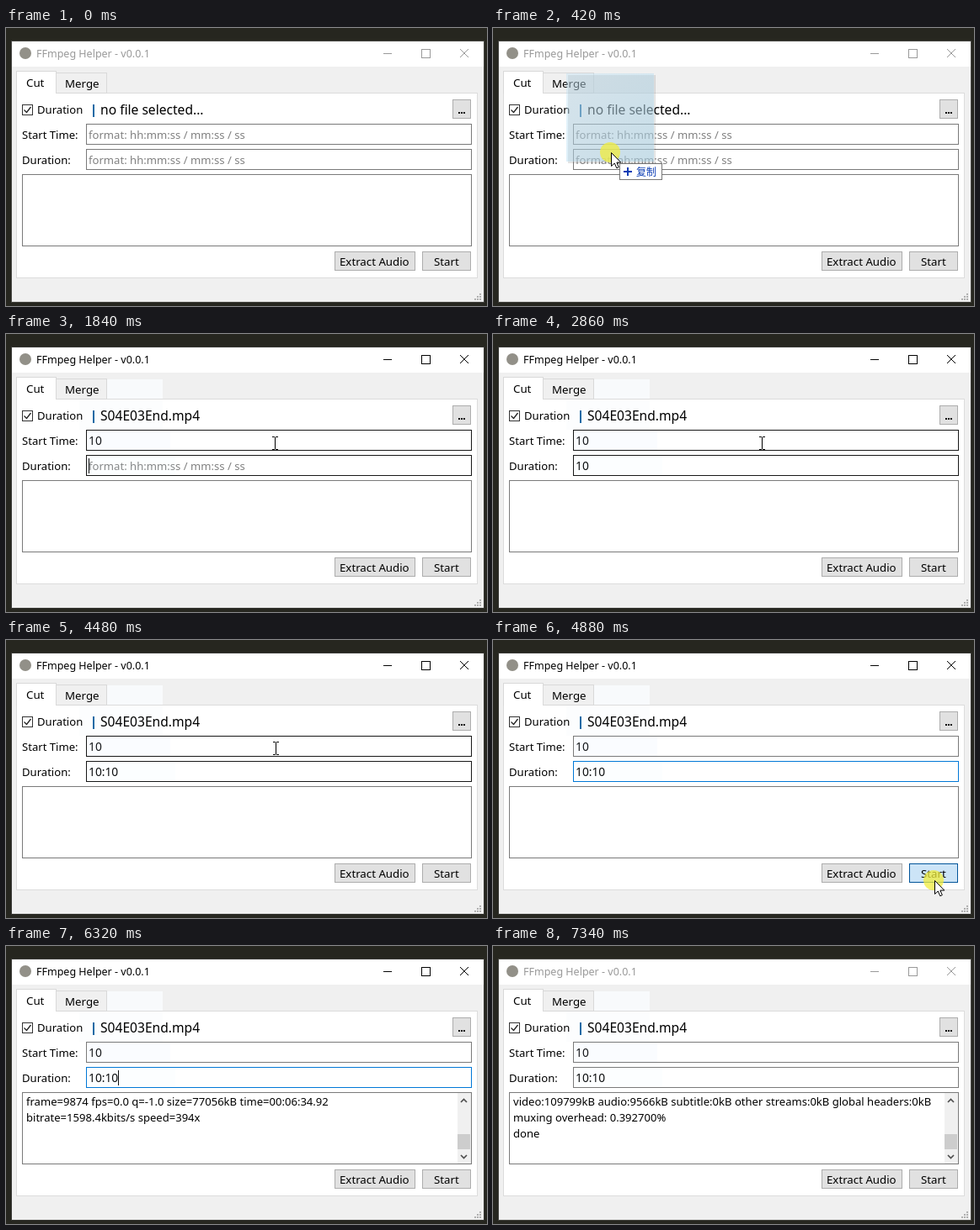
An HTML page with a canvas that plays this animation: 571x331 px, repeating every 8 s.

```html
<!DOCTYPE html>
<html lang="en">
<head>
<meta charset="utf-8">
<title>FFmpeg Helper</title>
<style>
  html, body { margin: 0; width: 100%; height: 100%; overflow: hidden; background: #26261f; }
  canvas { display: block; }
</style>
</head>
<body>
<canvas id="stage" width="571" height="331"></canvas>
<script>
const ctx = document.getElementById('stage').getContext('2d');
const LOOP = 8000;
const SANS = '"Noto Sans", "Open Sans", sans-serif';
const HINT = 'format: hh:mm:ss / mm:ss / ss';
const GREY = '#7a7a7a', DARK = '#171717', BLUE = '#0078d7';

const progress = (frame, size, time, rate, speed) => [
  `frame=${frame} fps=0.0 q=-1.0 size=${size}kB time=${time}`,
  `bitrate=${rate}kbits/s speed=${speed}x`
];

// Each step overrides part of the state from its time (ms) onward.
const steps = [
  [0, { active: false, file: 'no file selected...', start: '', duration: '', caret: '',
        startEdge: GREY, durationEdge: GREY, log: null, cursor: null, drag: false,
        click: false, trace: false, pressed: false }],
  [420, { drag: true, click: true, cursor: ['arrow', 140, 148] }],
  [630, { cursor: ['arrow', 200, 99] }],
  [830, { drag: false, click: false, trace: true, file: 'S04E03End.mp4',
          startEdge: DARK, cursor: ['arrow', 248, 89] }],
  [1020, { cursor: ['arrow', 290, 105] }],
  [1220, { active: true, caret: 'start', durationEdge: DARK, cursor: ['beam', 319, 130] }],
  [1420, { start: '10' }],
  [1840, { caret: 'duration' }],
  [2440, { duration: '1' }],
  [2650, { duration: '10' }],
  [2860, { caret: '' }],
  [3460, { duration: '10:', caret: 'duration' }],
  [3860, { duration: '10:10', caret: '' }],
  [4480, { cursor: ['beam', 320, 129] }],
  [4680, { cursor: ['arrow', 430, 215], startEdge: GREY, durationEdge: BLUE }],
  [4880, { cursor: ['arrow', 524, 286], click: true, pressed: true }],
  [5090, { click: false, pressed: false, log: ['Stream mapping:', '  Stream #0:0 -> #0:0 (copy)'] }],
  [5290, { cursor: ['beam', 400, 262] }],
  [5500, { cursor: ['beam', 313, 244],
           log: ['  Stream #0:1 -> #0:1 (copy)', 'Press [q] to stop, [?] for help'] }],
  [5700, { cursor: null }],
  [6120, { caret: 'duration', log: progress(5210, 40448, '00:03:28.40', '1589.9', 415) }],
  [6320, { log: progress(9874, 77056, '00:06:34.92', '1598.4', 394) }],
  [6520, { caret: '', log: progress(14120, 110336, '00:09:24.76', '1600.5', 376) }],
  [6720, { log: ['video:109799kB audio:9566kB subtitle:0kB other streams:0kB global headers:0kB',
                 'muxing overhead: 0.392700%', 'done'] }],
  [7120, { active: false, durationEdge: GREY }]
];

const stateAt = t => Object.assign({}, ...steps.filter(s => s[0] <= t).map(s => s[1]));

function fill(x, y, w, h, color) {
  ctx.fillStyle = color;
  ctx.fillRect(x, y, w, h);
}

function box(x, y, w, h, color, edge) {
  fill(x, y, w, h, edge);
  fill(x + 1, y + 1, w - 2, h - 2, color);
}

function text(str, x, y, size = 13.1, color = '#000', family = SANS) {
  ctx.font = `${size}px ${family}`;
  ctx.fillStyle = color;
  ctx.fillText(str, x, y);
}

function line(points, color, width = 1) {
  ctx.beginPath();
  points.forEach(([x, y]) => ctx.lineTo(x, y));
  ctx.strokeStyle = color;
  ctx.lineWidth = width;
  ctx.stroke();
}

function disc(x, y, r, color) {
  ctx.beginPath();
  ctx.arc(x, y, r, 0, 2 * Math.PI);
  ctx.fillStyle = color;
  ctx.fill();
}

function button(label, x, y, w, textX, pressed) {
  box(x, y, w, 23, pressed ? '#cce4f7' : '#e1e1e1', pressed ? '#005499' : '#adadad');
  text(label, textX, y + 17, 13.25);
}

function field(label, value, y, edge, caret) {
  text(label, 19, y + 18);
  box(95, y, 458, 25, '#fff', edge);
  if (value) text(value, 98, y + 18, 13.8);
  else text(HINT, 98, y + 18, 13.1, '#808080');
  if (caret) {
    const width = value ? ctx.measureText(value).width : 0;
    fill(98 + Math.floor(width), y + 4, 1, 18, '#000');
  }
}

function windowFrame(active) {
  const ink = active ? '#000' : '#999';
  box(6, 15, 562, 312, '#f0f0f0', active ? '#3a3a36' : '#4a4a46');
  fill(7, 16, 560, 30, '#fff');
  disc(23, 30, 7, '#929088');
  text('FFmpeg Helper - v0.0.1', 36, 35, 12.5, ink);
  fill(448, 30, 10, 1, ink);
  box(493, 25, 11, 11, '#fff', ink);
  line([[539, 25], [549, 35]], ink);
  line([[549, 25], [539, 35]], ink);
  for (let row = 0; row < 3; row++)
    for (let col = 2 - row; col < 3; col++)
      fill(556 + col * 3, 316 + row * 3, 2, 2, '#b0b0b0');
}

function tabs() {
  box(12, 77, 548, 221, '#fff', '#dcdcdc');
  box(59, 53, 61, 25, '#f0f0f0', '#d9d9d9');
  box(12, 51, 48, 27, '#fff', '#d9d9d9');
  fill(13, 77, 46, 2, '#fff');
  text('Cut', 24, 70, 13.3);
  text('Merge', 70, 71, 13.3);
}

function fileRow(file) {
  box(19, 91, 13, 13, '#fff', '#333');
  line([[21.5, 97.5], [24.5, 100.5], [29.5, 94]], '#222', 1.3);
  text('Duration', 37, 102);
  fill(103, 91, 2, 15, '#1a6aa5');
  text(file, 112, 103, 15.6);
  box(530, 85, 22, 23, '#e1e1e1', '#adadad');
  for (let i = 0; i < 3; i++) fill(537 + i * 3, 100, 2, 2, '#000');
}

function logArea(lines) {
  box(19, 174, 534, 86, '#fff', GREY);
  if (!lines) return;
  lines.forEach((str, i) => text(str, 24, 190 + i * 19, 13.05));
  fill(536, 175, 16, 84, '#f0f0f0');
  fill(536, 224, 15, 18, '#cdcdcd');
  line([[540, 186], [543.5, 182.5], [547, 186]], '#505050', 1.7);
  line([[540, 249], [543.5, 252.5], [547, 249]], '#505050', 1.7);
}

function dragGhost(x, y) {
  const left = x - 53, top = y - 94;
  const glass = ctx.createLinearGradient(left, top, left + 104, top + 105);
  glass.addColorStop(0, 'rgba(167,215,241,.28)');
  glass.addColorStop(1, 'rgba(160,210,234,.45)');
  fill(left + 2, top + 2, 104, 105, 'rgba(0,0,0,.12)');
  fill(left + 1, top + 1, 104, 105, 'rgba(255,255,255,.25)');
  fill(left, top, 104, 105, glass);
}

function copyTip(x, y) {
  box(x + 10, y + 13, 51, 20, '#fff', '#767676');
  fill(x + 15, y + 22, 10, 2, '#0a3cb4');
  fill(x + 19, y + 18, 2, 10, '#0a3cb4');
  text('复制', x + 30, y + 28, 12, '#0a3cb4', '"Noto Sans CJK SC", "Noto Sans CJK", sans-serif');
}

function pointer(kind, x, y) {
  if (kind === 'beam') {
    fill(x, y - 7, 1, 14, '#000');
    for (const end of [-8, 7]) {
      fill(x - 3, y + end, 3, 1, '#000');
      fill(x + 1, y + end, 3, 1, '#000');
    }
    return;
  }
  const outline = [[0, 0], [0, 16], [3.8, 12.5], [6.3, 18.3], [8.8, 17.2], [6.4, 11.6], [11.3, 11.6]];
  ctx.beginPath();
  outline.forEach(([dx, dy]) => ctx.lineTo(x + .5 + dx, y + .5 + dy));
  ctx.closePath();
  ctx.fillStyle = '#fff';
  ctx.fill();
  ctx.strokeStyle = '#000';
  ctx.lineWidth = 1;
  ctx.stroke();
}

function draw(s) {
  fill(0, 0, 571, 331, '#26261f');
  windowFrame(s.active);
  tabs();
  if (s.trace) {
    fill(120, 54, 66, 23, '#f8fafc');
    fill(87, 78, 99, 36, '#fcfdfe');
  }
  fileRow(s.file);
  field('Start Time:', s.start, 114, s.startEdge, s.caret === 'start');
  field('Duration:', s.duration, 144, s.durationEdge, s.caret === 'duration');
  if (s.trace) {
    fill(96, 115, 99, 23, 'rgba(200,225,250,.1)');
    fill(96, 145, 105, 23, 'rgba(200,225,250,.06)');
  }
  logArea(s.log);
  button('Extract Audio', 390, 266, 96, 396);
  button('Start', 494, 266, 58, 508, s.pressed);

  if (!s.cursor) return;
  const [kind, x, y] = s.cursor;
  if (s.drag) dragGhost(x, y);
  if (s.click) disc(x - 1, y, 12, 'rgba(240,236,60,.75)');
  if (s.drag) copyTip(x, y);
  pointer(kind, x, y);
}

function tick() {
  draw(stateAt(performance.now() % LOOP));
  requestAnimationFrame(tick);
}
tick();
</script>
</body>
</html>
```
